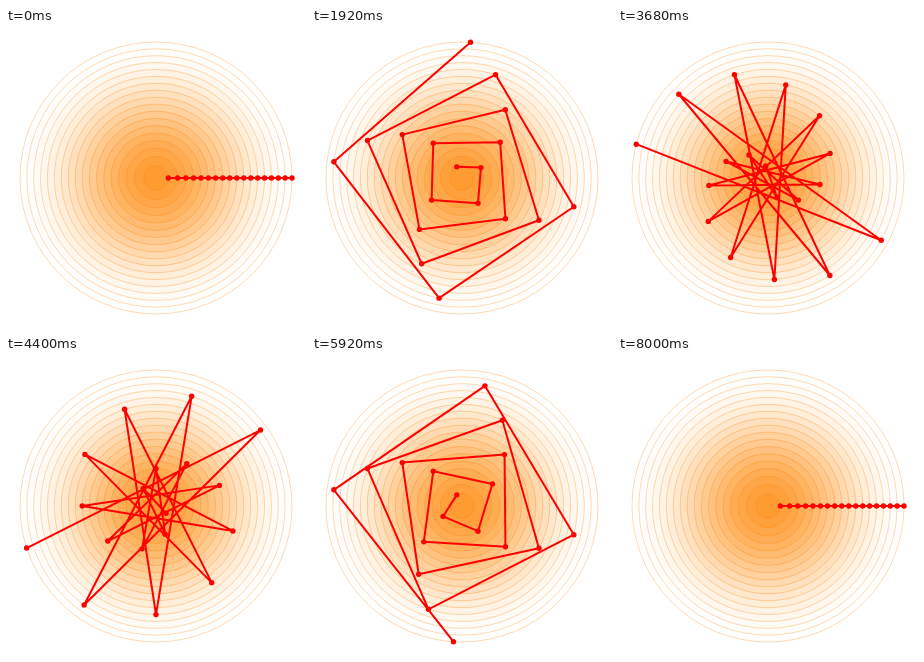
Recreate the animation shown at these times as an HTML page with a canvas. Size 300 by 300 pixels, loop 8.08 s.

```html
<!DOCTYPE html>
<html lang="en">
<head>
<meta charset="utf-8">
<title>Turning spiral</title>
<style>
  html, body { margin: 0; width: 100%; height: 100%; overflow: hidden; background: #fff; }
  canvas { display: block; width: 300px; height: 300px; }
</style>
</head>
<body>
<canvas id="stage" width="300" height="300"></canvas>
<script>
const ctx = document.getElementById('stage').getContext('2d');
const SIZE = 300;
const CENTER = SIZE / 2;
const COUNT = 18;
const STEP_MS = 80;
const STEPS = 101;

// Radii run from the outermost ring inwards; spacing widens slightly near the middle.
const radii = Array.from({ length: COUNT }, (_, k) => {
  const n = COUNT - k;
  return 5.69 + 6.609 * n + 3.93 * Math.log(n);
});

function circle(x, y, r) {
  ctx.beginPath();
  ctx.arc(x, y, r, 0, Math.PI * 2);
}

function drawRings() {
  ctx.lineWidth = 1;
  ctx.strokeStyle = 'rgba(255, 128, 0, 0.3)';
  radii.forEach((r, k) => {
    circle(CENTER, CENTER, r);
    ctx.fillStyle = `rgba(255, 128, 0, ${k * 0.01})`;
    ctx.fill();
    ctx.stroke();
  });
}

function drawSpiral(turn) {
  const points = radii.map((r, k) => {
    const angle = -(k + 1) * turn;
    return [CENTER + r * Math.cos(angle), CENTER + r * Math.sin(angle)];
  });

  ctx.strokeStyle = ctx.fillStyle = '#f00';
  ctx.lineWidth = 2;
  ctx.lineJoin = 'round';
  ctx.beginPath();
  points.forEach(([x, y]) => ctx.lineTo(x, y));
  ctx.stroke();

  for (const [x, y] of points) {
    circle(x, y, 2.7);
    ctx.fill();
  }
}

function draw(now) {
  const step = Math.floor(now / STEP_MS) % STEPS;
  ctx.fillStyle = '#fff';
  ctx.fillRect(0, 0, SIZE, SIZE);
  drawRings();
  drawSpiral(step / (STEPS - 1) * Math.PI * 2);
}

const start = performance.now();
function tick() {
  draw(performance.now() - start);
  requestAnimationFrame(tick);
}
tick();
</script>
</body>
</html>
```
